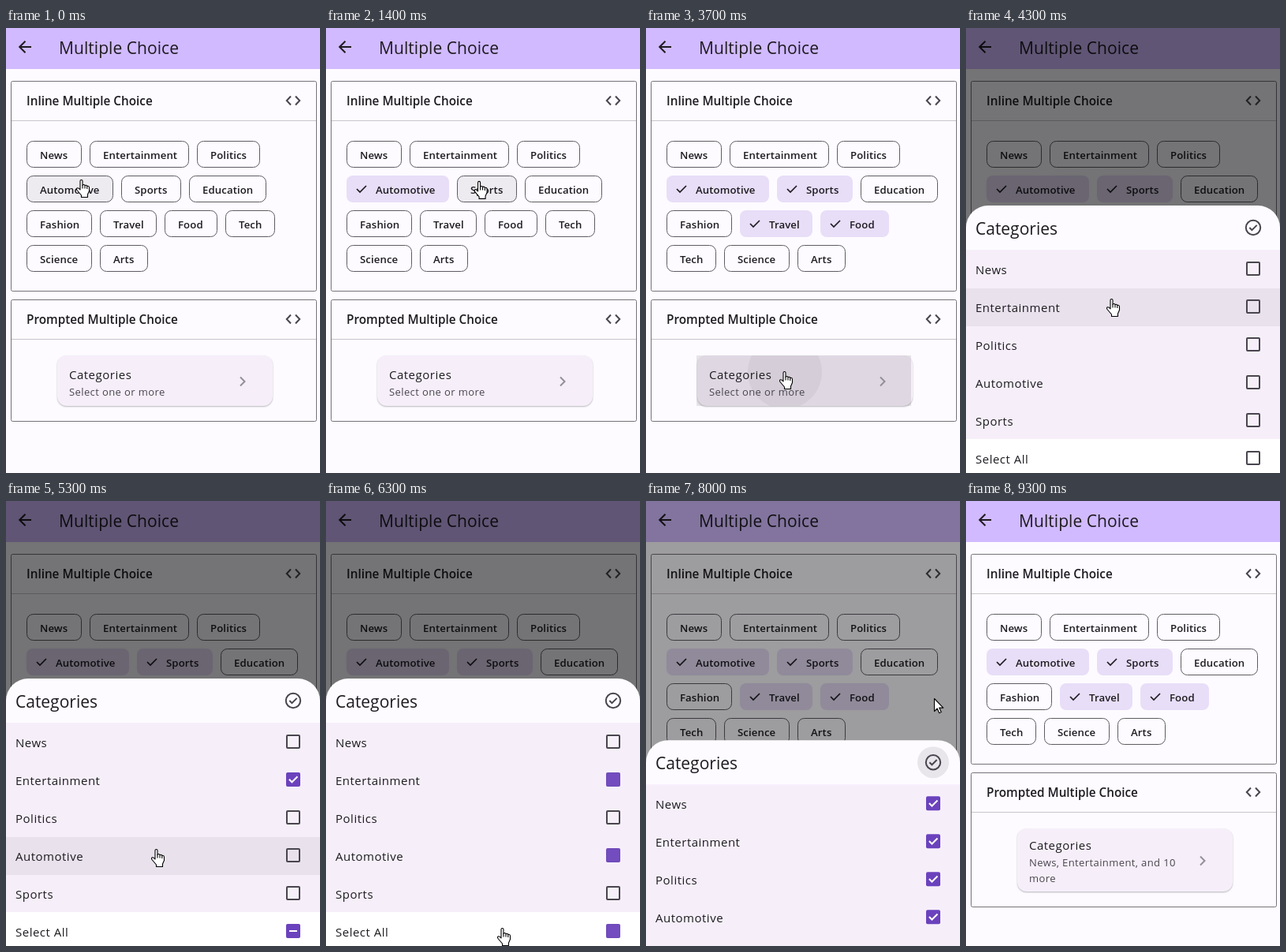
An HTML page with a canvas for the animation above (9800 ms loop, 398 px wide and 564 px high).

```html
<!DOCTYPE html>
<html lang="en">
<head>
<meta charset="utf-8">
<title>Multiple Choice</title>
<style>
html, body { margin: 0; width: 398px; height: 564px; overflow: hidden; background: #fdfbff; }
canvas { display: block; }
</style>
</head>
<body>
<canvas id="stage" width="398" height="564"></canvas>
<script>
const ctx = document.getElementById('stage').getContext('2d');
const W = 398, H = 564, LOOP = 9800, STEP = 100;
const INK = '#1d1b20', MUTED = '#49454f', SURFACE = '#fdfbff';
const CARD = '#f6effa', PRIMARY = '#6b42bd', CHOSEN = '#e8def8';
const shade = a => `rgba(29,27,32,${a})`;

// name, unselected width, tap time
const chips = [
  ['News', 70], ['Entertainment', 126], ['Politics', 80],
  ['Automotive', 110, 850], ['Sports', 76, 1520], ['Education', 98],
  ['Fashion', 83], ['Travel', 72, 2810], ['Food', 67, 2210],
  ['Tech', 63], ['Science', 83], ['Arts', 61]
];
const rows = ['News', 'Entertainment', 'Politics', 'Automotive', 'Sports'];
const firstTap = { Entertainment: 4680, Automotive: 5360 };
const CLEAR = 6195, SELECT_ALL = 6690, OPEN = 3780, CLOSE = 7883, CLOSED = 8083;
const CARD_PRESS = 3550;

// time, x, y
const path = [
  [0, 95, 192], [1050, 95, 192], [1450, 198, 194], [1750, 198, 194],
  [2150, 236, 242], [2350, 236, 242], [2600, 163, 243], [3000, 163, 243],
  [3450, 175, 435], [3900, 175, 435], [4250, 184, 343], [4900, 184, 343],
  [5250, 190, 441], [5650, 190, 441], [6100, 223, 541], [6900, 223, 541],
  [7500, 365, 250], [9100, 365, 250], [9300, 400, 150]
];

const clamp = v => Math.max(0, Math.min(1, v));
const span = (t, from, length) => clamp((t - from) / length);
const smooth = p => p * p * (3 - 2 * p);
const mix = (a, b, p) => a + (b - a) * p;

function bezier(x1, y1, x2, y2, x) {
  const at = (a, b, s) => 3 * (1 - s) * (1 - s) * s * a + 3 * (1 - s) * s * s * b + s ** 3;
  let low = 0, high = 1;
  for (let i = 0; i < 24; i++) {
    const mid = (low + high) / 2;
    if (at(x1, x2, mid) < x) low = mid; else high = mid;
  }
  return at(y1, y2, low);
}

function cursorAt(t) {
  const next = path.findIndex(k => k[0] > t);
  if (next < 0) return { x: 400, y: 150 };
  const a = path[next - 1], b = path[next];
  const p = smooth((t - a[0]) / (b[0] - a[0]));
  return { x: mix(a[1], b[1], p), y: mix(a[2], b[2], p) };
}

const inside = (c, x, y, w, h) => c.x >= x && c.x < x + w && c.y >= y && c.y < y + h;

function box(x, y, w, h, r, fill, stroke, width = 1) {
  ctx.beginPath();
  ctx.roundRect(x, y, w, h, r);
  if (fill) { ctx.fillStyle = fill; ctx.fill(); }
  if (stroke) { ctx.strokeStyle = stroke; ctx.lineWidth = width; ctx.stroke(); }
}

function disc(x, y, r, fill) {
  ctx.beginPath();
  ctx.arc(x, y, r, 0, 7);
  ctx.fillStyle = fill;
  ctx.fill();
}

function line(points, color, width = 2) {
  ctx.beginPath();
  points.forEach(([x, y]) => ctx.lineTo(x, y));
  ctx.strokeStyle = color;
  ctx.lineWidth = width;
  ctx.stroke();
}

function text(label, x, y, size, { weight = 400, spacing = 0, color = INK } = {}) {
  ctx.font = `${weight} ${size}px "Open Sans", "Noto Sans", sans-serif`;
  ctx.letterSpacing = spacing + 'px';
  ctx.fillStyle = color;
  ctx.fillText(label, x, y);
}

// Tick centred on x, y, drawn from its short end.
function tick(x, y, scale, p, color, width) {
  if (p <= 0) return;
  const a = [x - 6 * scale, y], b = [x - 2 * scale, y + 4 * scale], c = [x + 6 * scale, y - 4 * scale];
  const first = clamp(p * 3), second = clamp((p * 3 - 1) / 2);
  const points = [a, [mix(a[0], b[0], first), mix(a[1], b[1], first)]];
  if (second > 0) points.push([mix(b[0], c[0], second), mix(b[1], c[1], second)]);
  line(points, color, width);
}

function panel(y, height, title) {
  box(6.5, y + .5, 387, height, 2, null, '#75717a');
  line([[7, y + 50.5], [393, y + 50.5]], '#c9c5cd', 1);
  text(title, 26, y + 31, 15.3, { weight: 600 });
  const cy = y + 25;
  line([[361, cy - 5.5], [355.8, cy], [361, cy + 5.5]], MUTED);
  line([[367, cy - 5.5], [372.2, cy], [367, cy + 5.5]], MUTED);
}

function drawChips(t, cursor, modal) {
  let x = 26, y = 143, hot = false;
  for (const [name, base, tap] of chips) {
    const p = tap ? smooth(span(t, tap, 190)) : 0;
    const w = base + 20 * p;
    if (x + w > 373) { x = 26; y += 44; }
    const hover = !modal && inside(cursor, x, y, w, 34);
    hot ||= hover;
    if (p > 0) {
      ctx.globalAlpha = p;
      box(x, y, w, 34, 8, CHOSEN);
      ctx.globalAlpha = 1;
    }
    box(x + .5, y + .5, w - 1, 33, 8, hover ? shade(.065) : null, `rgba(95,91,100,${1 - p})`);
    tick(x + 19, y + 17, 1, p, INK, 1.7);
    text(name, x + 17 + 20 * p, y + 23, 13.2, { weight: 600, spacing: .1 });
    x += w + 10;
  }
  return hot;
}

function drawCard(t, cursor, modal) {
  const done = t >= CLOSED, h = done ? 81 : 65;
  ctx.save();
  ctx.shadowColor = 'rgba(0,0,0,.28)';
  ctx.shadowBlur = 2;
  ctx.shadowOffsetY = 1;
  box(65, 415, 273, h - 1, 12, CARD);
  ctx.restore();
  const hover = t < 4000 && inside(cursor, 65, 415, 273, h);
  if (hover) {
    ctx.save();
    ctx.beginPath();
    ctx.rect(64, 415, 272, 64);
    ctx.clip();
    ctx.fillStyle = shade(t > CARD_PRESS ? .105 : .07);
    ctx.fillRect(64, 415, 272, 64);
    if (t > CARD_PRESS) disc(176, 436, (t - CARD_PRESS) * .313, shade(.05));
    ctx.restore();
  }
  text('Categories', 80, done ? 442 : 445, 15, { spacing: .5 });
  const small = (label, y) => text(label, 80, y, 13, { spacing: .4, color: MUTED });
  if (done) {
    small('News, Entertainment, and 10', 463);
    small('more', 483);
  } else small('Select one or more', 466);
  const cy = done ? 456 : 448;
  line([[297, cy - 5.5], [302.5, cy], [297, cy + 5.5]], '#938f98');
  return hover && !modal;
}

function drawPage(t, cursor, modal) {
  ctx.fillStyle = SURFACE;
  ctx.fillRect(0, 0, W, H);
  ctx.fillStyle = '#d1baff';
  ctx.fillRect(0, 0, W, 52);
  line([[17, 24], [32, 24]], INK);
  line([[24.5, 16.7], [17.2, 24], [24.5, 31.3]], INK);
  text('Multiple Choice', 67, 33, 21, { spacing: .05 });
  panel(67, 266, 'Inline Multiple Choice');
  panel(344, t >= CLOSED ? 170 : 154, 'Prompted Multiple Choice');
  const overChip = drawChips(t, cursor, modal);
  return drawCard(t, cursor, modal) || overChip;
}

function checkbox(y, p, dash) {
  const fill = clamp(p * 2), mark = clamp(p * 2 - 1);
  if (fill > 0) {
    ctx.globalAlpha = fill;
    box(355, y - 9, 18, 18, 2, PRIMARY);
    ctx.globalAlpha = 1;
  }
  if (fill < 1) {
    ctx.globalAlpha = 1 - fill;
    box(356, y - 8, 16, 16, 1, null, MUTED, 2);
    ctx.globalAlpha = 1;
  }
  if (dash && mark > 0) line([[364 - 5 * mark, y], [364 + 5 * mark, y]], '#fff');
  else tick(364.2, y - .2, .88, mark, '#fff', 2);
}

function checkState(t, tap) {
  if (t >= SELECT_ALL) return span(t, SELECT_ALL, 200);
  if (!tap) return 0;
  return t >= CLEAR ? 1 - span(t, CLEAR, 200) : span(t, tap, 200);
}

function drawSheet(t, cursor) {
  const v = t < CLOSE ? span(t, OPEN, 250) : 1 - span(t, CLOSE, 200);
  if (v <= 0) return false;
  ctx.fillStyle = `rgba(0,0,0,${.54 * bezier(.25, .1, .25, 1, v)})`;
  ctx.fillRect(0, 0, W, H);

  const drop = 339 * (1 - bezier(0, 0, .2, 1, v));
  const live = t < CLOSE;
  let hot = live && cursor.y > 521 + drop;
  ctx.save();
  ctx.translate(0, drop);
  box(0, 225, W, 360, [28, 28, 0, 0], SURFACE);
  ctx.fillStyle = CARD;
  ctx.fillRect(0, 281, W, 240);
  ctx.fillStyle = '#fff';
  ctx.fillRect(0, 521, W, 60);
  text('Categories', 12, 262, 21);

  if (Math.hypot(cursor.x - 364, cursor.y - 253) < 20) {
    disc(364, 253, 20, shade(t >= 7700 ? .09 : .07));
    hot = live;
  }
  ctx.beginPath();
  ctx.arc(364, 253, 9.2, 0, 7);
  ctx.strokeStyle = MUTED;
  ctx.lineWidth = 2;
  ctx.stroke();
  tick(364, 253, .78, 1, MUTED, 2);

  rows.forEach((name, i) => {
    const y = 281 + 48 * i;
    if (live && inside(cursor, 0, y + drop, W, 48)) {
      ctx.fillStyle = shade(.06);
      ctx.fillRect(0, y + 1, W, 48);
      hot = true;
    }
    text(name, 12, y + 31, 15, { spacing: .5 });
    checkbox(y + 24, checkState(t, firstTap[name]));
  });
  text('Select All', 12, 552, 15, { spacing: .5 });
  checkbox(545, checkState(t, firstTap.Entertainment), t < SELECT_ALL);
  ctx.restore();
  return hot;
}

const hand = new Path2D('M5 2Q5 .5 6.5 .5T8 2V7.2Q9.5 5.8 11 7.5Q12.7 6.6 13.8 8.4Q16.5 7.8 16.5 10.5V14.5L14.5 19V22.5H6.5V20L1 13.5Q-.2 11.5 1.5 10.8Q2.8 10.4 5 13Z');
const knuckles = new Path2D('M8 7V11.5M11 7.5V11.5M13.8 8.4V12');
const arrow = new Path2D('M.5 .5V16.5L4.2 13L6.7 18.7L9.2 17.6L6.7 12.1H11.8Z');

function drawCursor({ x, y }, isHand) {
  ctx.save();
  ctx.translate(isHand ? x - 6 : x, y);
  ctx.fillStyle = '#fff';
  ctx.strokeStyle = '#000';
  ctx.lineWidth = 1.1;
  ctx.lineJoin = 'round';
  const shape = isHand ? hand : arrow;
  ctx.fill(shape);
  ctx.stroke(shape);
  if (isHand) ctx.stroke(knuckles);
  ctx.restore();
}

function draw(now) {
  const t = Math.floor((now % LOOP) / STEP) * STEP;
  const cursor = cursorAt(t);
  const modal = t >= OPEN && t < CLOSED;
  const overPage = drawPage(t, cursor, modal);
  const overSheet = modal && drawSheet(t, cursor);
  drawCursor(cursor, overPage || overSheet);
}

let start;
function tickFrame(now) {
  start ??= now;
  draw(now - start);
  requestAnimationFrame(tickFrame);
}
draw(0);
requestAnimationFrame(tickFrame);
</script>
</body>
</html>
```
